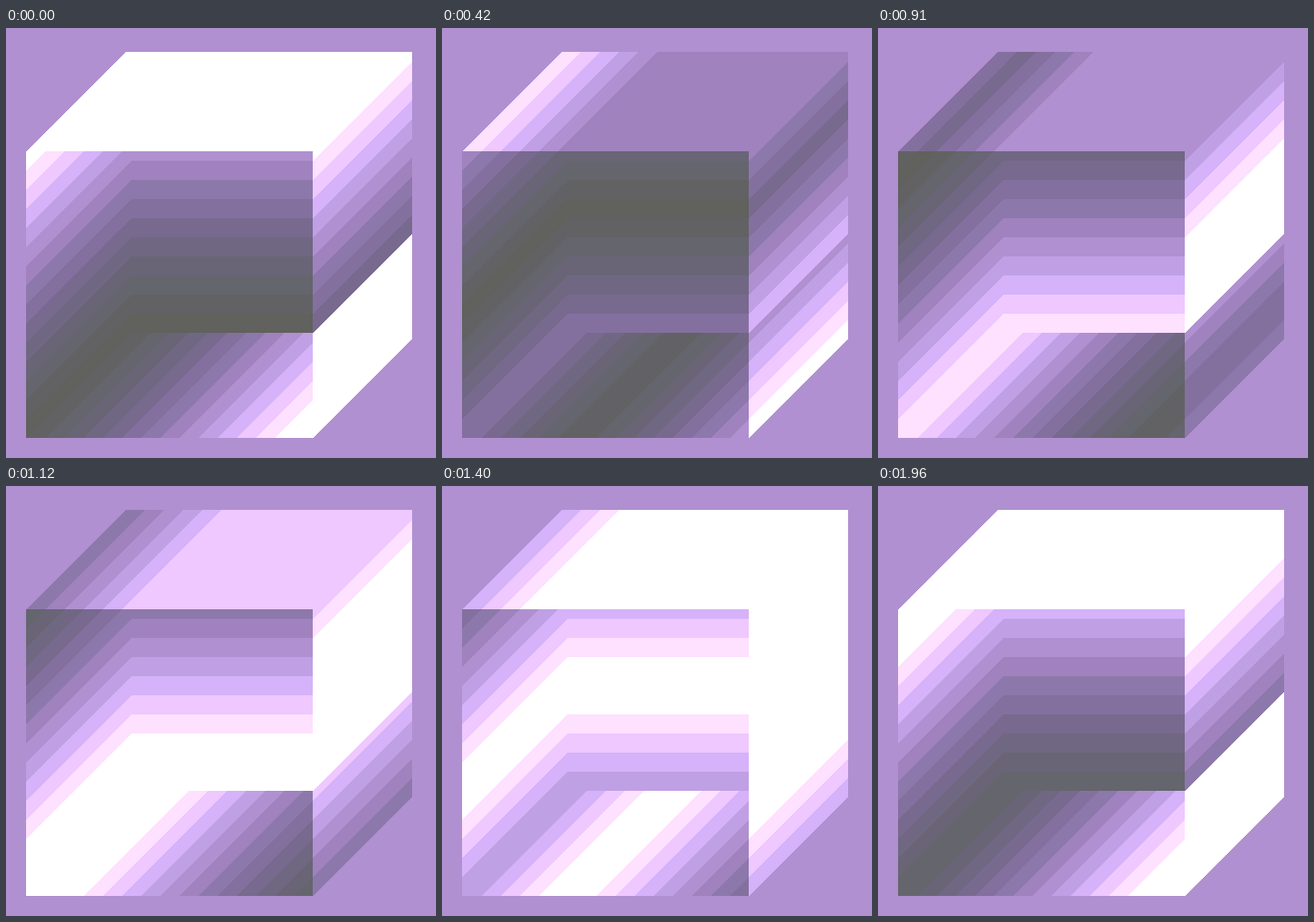
These frames come from a looping animation (450 by 450 pixels, 2030 ms). An HTML page with a canvas:

```html
<!DOCTYPE html>
<html lang="en">
<head>
<meta charset="utf-8">
<title>Striped cube</title>
<style>
  html, body { margin: 0; width: 100%; height: 100%; overflow: hidden; background: #b090d0; }
  canvas { display: block; width: 450px; height: 450px; image-rendering: pixelated; }
</style>
</head>
<body>
<canvas id="stage" width="450" height="450"></canvas>
<script>
const SIZE = 450, STEPS = 29, STEP_MS = 70, BAND = 20;

// Shades from light to dark; a level is an index into this ramp.
const RAMP = [
  0xffffff, 0xfee0ff, 0xeec8ff, 0xd5b2f9, 0xc0a0e4, 0xb090d0, 0x9f82be, 0x8d78ab,
  0x84709f, 0x78698f, 0x706883, 0x696576, 0x65656e, 0x626265, 0x61615d
];
const BACKGROUND = 5;

const toPixel = rgb =>
  (0xff000000 | (rgb & 255) << 16 | (rgb & 0xff00) | rgb >> 16) >>> 0;
const pixels = RAMP.map(toPixel);

// A triangular pulse: darkest around the centre, white outside it.
const pulse = (period, centre, height) => phase => {
  const p = (phase + period) % period;
  return Math.max(0, height - Math.abs(p - centre));
};
const wall = pulse(30, 14, 14);
const outer = pulse(30, 9, 9);
const floor = pulse(29, 14.5, 13.5);
const foot = pulse(29, 14.5, 8.5);

const cells = [{ wave: () => BACKGROUND, offset: 0 }];
const cellIds = new Map();

function cellId(name, wave, offset) {
  const key = name + offset;
  if (!cellIds.has(key)) {
    cellIds.set(key, cells.length);
    cells.push({ wave, offset });
  }
  return cellIds.get(key);
}

const band = distance => Math.floor(distance / BAND);

function cellAt(x, y) {
  const sum = x + y;
  if (x >= 21 && x < 321 && y >= 129 && y < 429) {
    const bend = Math.min(x, 131) + y;
    return bend < 450
      ? cellId("wall", wall, band(bend - 150))
      : cellId("floor", floor, 14 - band(sum - 450));
  }
  if (y >= 25 && y < 129 && sum >= 150 && sum < 450) {
    return cellId("outer", outer, Math.min(band(sum - 150), 5) - 5);
  }
  if (x >= 321 && x < 425 && sum >= 450 && sum < 750) {
    return sum < 640
      ? cellId("outer", outer, band(sum - 440))
      : cellId("foot", foot, 14 - band(sum - 450));
  }
  return 0;
}

const map = new Uint8Array(SIZE * SIZE);
for (let i = 0; i < map.length; i++) map[i] = cellAt(i % SIZE, Math.floor(i / SIZE));

const ctx = document.getElementById("stage").getContext("2d");
const image = ctx.createImageData(SIZE, SIZE);
const buffer = new Uint32Array(image.data.buffer);
let shown = -1;

function draw(step) {
  const colours = cells.map(c => pixels[c.wave(c.offset + step)]);
  for (let i = 0; i < map.length; i++) buffer[i] = colours[map[i]];
  ctx.putImageData(image, 0, 0);
  shown = step;
}

function tick() {
  const step = Math.floor(performance.now() / STEP_MS) % STEPS;
  if (step !== shown) draw(step);
  requestAnimationFrame(tick);
}

draw(0);
requestAnimationFrame(tick);
</script>
</body>
</html>
```
